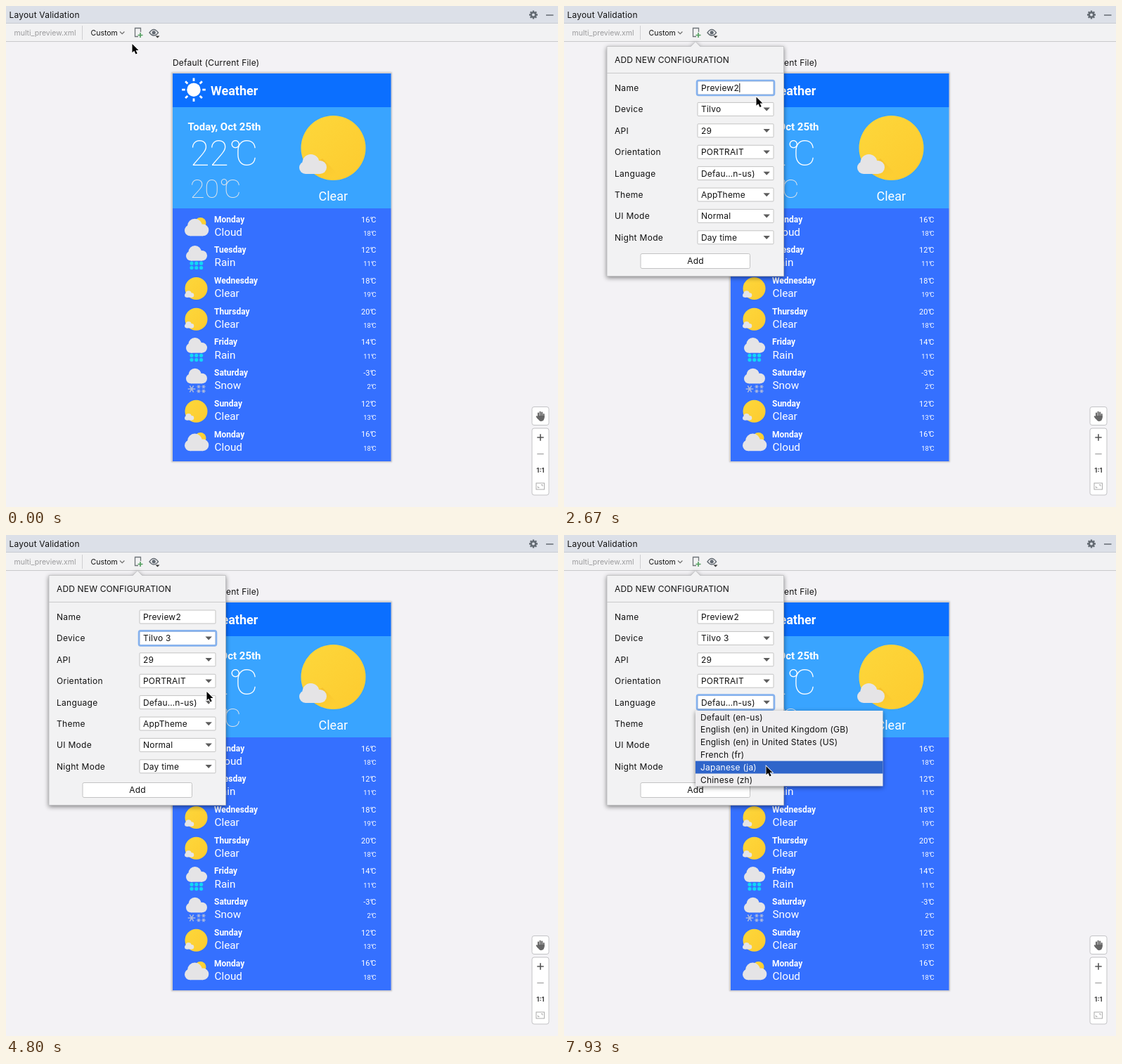
Recreate the animation shown at these times as an HTML page. Size 785 px wide and 713 px high, loop 8 s.

```html
<!DOCTYPE html>
<html lang="en">
<head>
<meta charset="utf-8">
<title>Layout Validation</title>
<style>
  html, body { margin: 0; width: 100%; height: 100%; overflow: hidden; background: #f3f2f5; }
  svg { display: block; width: 785px; height: 713px; }
  text { font: 12px Inter, sans-serif; letter-spacing: .2px; fill: #111; white-space: pre; }
  .small text { font-size: 10.5px; letter-spacing: 0; }
  .weather text { font-family: Roboto, sans-serif; letter-spacing: 0; fill: #fff; }
  .shadow { filter: drop-shadow(0 2px 3px #0007); }
</style>
</head>
<body>
<svg id="stage" viewBox="0 0 785 713"></svg>
<script>
const LOOP = 8000;
const stage = document.getElementById('stage');

const rect = (x, y, w, h, fill, extra = '') =>
  `<rect x="${x}" y="${y}" width="${w}" height="${h}" fill="${fill}" ${extra}/>`;
const circle = (x, y, r, fill) => `<circle cx="${x}" cy="${y}" r="${r}" fill="${fill}"/>`;
const line = (d, color, width = 1, extra = '') =>
  `<path d="${d}" fill="none" stroke="${color}" stroke-width="${width}" ${extra}/>`;
const text = (x, y, s, style = '') => `<text x="${x}" y="${y}" style="${style}">${s}</text>`;
const degrees = (x, y, n, style) =>
  text(x, y, `${n}°<tspan dx="-.2em">C</tspan>`, style);
const cloud = (x, y, scale) =>
  `<use href="#cloud" transform="translate(${x} ${y}) scale(${scale})"/>`;
const spokes = (x, y, count, from, to, color, width) => {
  let d = '';
  for (let i = 0; i < count; i++) {
    const a = i * 2 * Math.PI / count, c = Math.cos(a), s = Math.sin(a);
    d += `M${x + from * c} ${y + from * s}L${x + to * c} ${y + to * s}`;
  }
  return line(d, color, width);
};

const defs = `<defs>
  <g id="cloud" fill="#e5e4e6">
    <circle cx="9" cy="19" r="9"/><circle cx="16.5" cy="12" r="12"/>
    <circle cx="29.5" cy="18.5" r="9.5"/><rect x="9" y="14" width="20.5" height="14"/>
  </g>
  <linearGradient id="gold" x2="1" y2="1">
    <stop stop-color="#fdd73b"/><stop offset="1" stop-color="#fdcb2f"/>
  </linearGradient>
  <linearGradient id="shade" x2="1" y2="1">
    <stop stop-color="#e8a51c" stop-opacity=".6"/><stop offset=".75" stop-color="#f5b925" stop-opacity="0"/>
  </linearGradient>
  <clipPath id="sunClip"><circle cx="465.5" cy="202" r="46"/></clipPath>
</defs>`;

function toolbar() {
  const gray = '#646b73';
  return rect(0, 0, 785, 25, '#dce0e8') + rect(0, 24, 785, 1, '#c8cbd1') +
    rect(0, 25, 785, 25, '#f2f2f3') + rect(0, 50, 785, 1, '#c9c9cb') +
    text(4.5, 17, 'Layout Validation') +
    spokes(750, 12.5, 8, 3, 6, gray, 2.4) +
    `<circle cx="750" cy="12.5" r="3.3" fill="none" stroke="${gray}" stroke-width="2.6"/>` +
    line('M768 13H778.5', gray, 1.5) +
    `<g class="small">${text(11.5, 41.5, 'multi_preview.xml', 'fill:#9b9b9d')}${text(120.5, 41.5, 'Custom')}</g>` +
    line('M108.5 28V48', '#cfcfd1') +
    line('M162 36.5l3.2 3.2 3.2-3.2', '#6e6e6e', 1.2) +
    line('M188 43.5H183.5V31.5H191.5V37', '#6e7479', 1.3) +
    line('M191 38V45M187.5 41.5H194.5', '#4f9e5c', 1.6) +
    line('M204 38Q210 29 216.5 38Q210 46 204 38Z', gray, 1.4) +
    circle(210.2, 37.8, 2.6, gray) +
    '<path d="M212.5 42.5h6l-3 3z" fill="#333"/>';
}

function forecastIcon(kind) {
  if (kind === 'Cloud') return circle(276.5, 309, 8, 'url(#gold)') + cloud(254, 302.7, .88);
  if (kind === 'Clear') return circle(270.5, 314.6, 16, 'url(#gold)') + cloud(254, 317.8, .34);
  let icon = cloud(256, 297.3, .77);
  if (kind === 'Rain') {
    for (const x of [264, 270.8, 277.6])
      for (const y of [322.5, 328.8]) icon += circle(x, y, 2.6, '#12d7f6');
  } else {
    icon += spokes(264, 326.5, 6, 0, 5.3, '#a9b7dd', 1.6);
    for (const x of [274, 281])
      for (const y of [323.3, 329.6]) icon += spokes(x, y, 6, 0, 2.7, '#a9b7dd', 1.1);
  }
  return icon;
}

function weatherCard() {
  const days = [
    ['Monday', 'Cloud', 16, 18], ['Tuesday', 'Rain', 12, 11], ['Wednesday', 'Clear', 18, 19],
    ['Thursday', 'Clear', 20, 18], ['Friday', 'Rain', 14, 11], ['Saturday', 'Snow', -3, 2],
    ['Sunday', 'Clear', 12, 13], ['Monday', 'Cloud', 16, 18]
  ];
  const rows = days.map(([day, sky, high, low], i) => `<g transform="translate(0 ${i * 43.7})">` +
    forecastIcon(sky) +
    text(296, 307.7, day, 'font-size:12px;font-weight:700') +
    text(296.5, 326.8, sky, 'font-size:15.3px') +
    degrees(526.5, 307.5, high, 'font-size:11px;text-anchor:end') +
    degrees(526.5, 326.8, low, 'font-size:9.3px;text-anchor:end') + '</g>').join('');

  return text(237, 85, 'Default (Current File)') +
    rect(235.5, 94.5, 313, 554.5, '#d2cfcf', 'style="filter:drop-shadow(0 0 1px #0004)"') +
    rect(237, 96, 310.5, 48, '#0b6fff') +
    rect(237, 144, 310.5, 144, '#39a4ff') +
    rect(237, 288, 310.5, 360, '#3570ff') +
    '<g class="weather">' +
    circle(267, 119.2, 9.7, '#fff') + spokes(267, 119.2, 8, 12.3, 16.8, '#fff', 2.8) +
    text(291, 126.6, 'Weather', 'font-size:18px;font-weight:700') +
    text(258.5, 176.5, 'Today, Oct 25th', 'font-size:15px;font-weight:700') +
    degrees(262, 227, 22, 'font-size:50px;font-weight:200') +
    degrees(262, 273, 20, 'font-size:37.5px;font-weight:200;fill:#dde4ec') +
    circle(465.5, 202, 46, 'url(#gold)') +
    '<path d="M450 217L482 249H424V238Z" fill="url(#shade)" clip-path="url(#sunClip)"/>' +
    cloud(417, 211, 1) +
    text(444.5, 277, 'Clear', 'font-size:18px') + rows + '</g>';
}

function zoomButtons() {
  const box = (y, h) => rect(748, y, 24, h, '#fff', 'rx="3" stroke="#c3c3c6"');
  const gray = '#666';
  return box(570.5, 26) + box(601, 95) +
    line('M757 585V579.5M759.6 583V577.8M762.2 583V578.5M764.7 585V581M757 587L754.8 584.3',
      gray, 2, 'stroke-linecap="round"') +
    `<path d="M756 583H765.7V586Q765 591 760.5 591Q758.5 591 755 585.5Z" fill="${gray}"/>` +
    line('M755.3 614H764.7M760 609.3V618.7', '#555', 1.6) +
    line('M755.3 637.5H764.7', '#aaa', 1.4) +
    text(760, 663.5, '1:1', 'font-size:9.5px;font-weight:700;letter-spacing:0;text-anchor:middle;fill:#444') +
    rect(754, 679, 11.5, 9, 'none', 'stroke="#aaa"') +
    line('M756.5 685.5V683.5M756.5 685.5H758.5M763 681.5H761M763 681.5V683.5', '#aaa');
}

const fields = [
  ['Name'], ['Device'], ['API', '29'], ['Orientation', 'PORTRAIT'], ['Language', 'Defau…n-us)'],
  ['Theme', 'AppTheme'], ['UI Mode', 'Normal'], ['Night Mode', 'Day time']
];
const devices = ['Tilvo', 'Tilvo 2', 'Kezub 5X', 'Tilvo 3', 'Tilvo XL', 'Tilvo 3a', 'Kezub 6P', 'Kezub 6'];
const languages = ['Default (en-us)', 'English (en) in United Kingdom (GB)',
  'English (en) in United States (US)', 'French (fr)', 'Japanese (ja)', 'Chinese (zh)'];

function dialog(name, device, focus, caret) {
  const rows = fields.map(([label, value], i) => {
    const y = 116.5 + i * 30.4;
    const ring = focus === i ? rect(189, y - 10.5, 110, 21, 'none', 'rx="2.5" stroke="#86b2ee" stroke-width="2.6"') : '';
    return text(72, y + 4.4, label, 'letter-spacing:.3px') +
      rect(190, y - 9.5, 108, 19, '#fff', 'rx="1" stroke="#c3c3c3"') + ring +
      text(195, y + 4.4, [name, device][i] ?? value) +
      (i ? `<path d="M283.5 ${y - 2.3}h9.4l-4.7 5z" fill="#5c5c5c"/>` : '');
  }).join('');
  return '<path class="shadow" d="M61 57.5H180.5L187 50.5L193.5 57.5H312.5V384.5H61Z" fill="#f2f2f3" stroke="#bdbdbf" stroke-width=".8"/>' +
    text(72, 80.5, 'ADD NEW CONFIGURATION', 'letter-spacing:.15px') +
    rect(61, 95, 251, 1, '#c9c9cb') + rows +
    (caret ? line('M249.8 110V123', '#111') : '') +
    rect(109, 352.5, 155.5, 21, '#fff', 'rx="2" stroke="#c3c3c3"') +
    text(187, 367.4, 'Add', 'text-anchor:middle');
}

function dropdown(items, top, width, rowWidth, cursorY) {
  const pitch = 17.9;
  const active = Math.max(0, Math.floor((cursorY - top) / pitch));
  return rect(187, top, width, items.length * pitch, '#efeef0', 'class="shadow"') +
    rect(187, top + active * pitch, rowWidth, pitch, '#2f65ca') +
    items.map((item, i) =>
      text(194, top + i * pitch + 13.5, item, i === active ? 'fill:#fff' : '')).join('');
}

// Pointer path: time, x, y
const path = [
  [0, 179.5, 54], [450, 188, 40], [850, 188, 40], [1270, 204, 79.5], [1750, 264, 117], [2150, 264, 117],
  [2550, 273.5, 129.5], [2700, 273.5, 129.5], [3150, 284, 150], [3550, 284, 156], [3700, 284, 157],
  [4200, 285.5, 223], [4900, 285.5, 223], [5500, 283.5, 238.5], [6850, 283.5, 238.5],
  [7800, 287.5, 329], [LOOP, 287.5, 329]
];
function pointer(t) {
  const i = path.findIndex(p => p[0] > t);
  const [t0, x0, y0] = path[i - 1], [t1, x1, y1] = path[i];
  const u = (t - t0) / (t1 - t0), e = u * u * (3 - 2 * u);
  return [x0 + (x1 - x0) * e, y0 + (y1 - y0) * e];
}

stage.innerHTML = defs + toolbar() + weatherCard() + zoomButtons() + '<g id="popup"></g>' +
  '<path id="cursor" d="M0 0V12.3L2.8 9.8L5 14.6L7.2 13.6L5.1 9H9Z" stroke="#fff" stroke-width="1.6" paint-order="stroke"/>';
const popup = document.getElementById('popup');
const cursor = document.getElementById('cursor');
let shown;

function draw(now) {
  const t = now % LOOP;
  const [x, y] = pointer(t);
  let markup = '';
  if (t >= 650) {
    const focus = t < 1800 ? -1 : t < 3300 ? 0 : t < 5900 ? 1 : 4;
    markup = dialog(t < 2250 ? 'Preview' : 'Preview2', t < 4400 ? devices[0] : devices[3],
      focus, t >= 2250 && t < 3300);
    if (t >= 3350 && t < 4400)
      markup += dropdown(devices, 159, 236, 223.5, y) + rect(410.5, 159, 12.5, 143.2, '#f7f7f8') +
        rect(413, 162, 7.5, 19.5, '#b9b9bb', 'rx="3.7"');
    if (t >= 6000) markup += dropdown(languages, 250, 266.5, 266.5, y);
  }
  if (markup !== shown) popup.innerHTML = shown = markup;
  cursor.setAttribute('transform', `translate(${x} ${y})`);
  requestAnimationFrame(draw);
}
requestAnimationFrame(draw);
</script>
</body>
</html>
```
